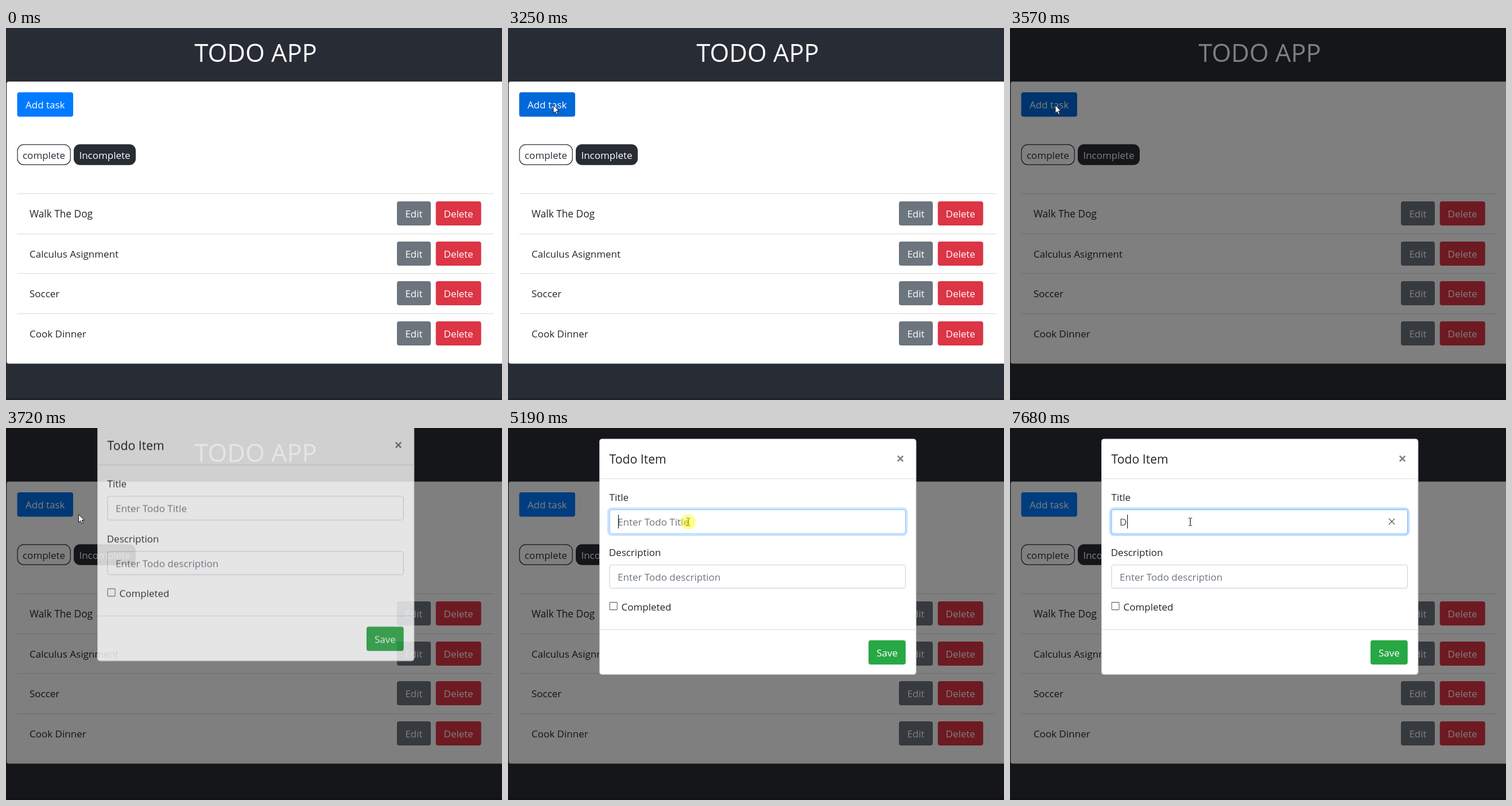
An HTML page with a canvas that plays this animation: 864x648 px, repeating every 8 s.

```html
<!DOCTYPE html>
<html lang="en">
<head>
<meta charset="utf-8">
<title>Todo app</title>
<style>
  html, body { margin: 0; width: 100%; height: 100%; overflow: hidden; background: #282c34; }
  canvas { display: block; width: 864px; height: 648px; }
</style>
</head>
<body>
<canvas id="stage" width="864" height="648"></canvas>
<script>
const W = 864, H = 648, LOOP = 8000;
const FONT = '"Open Sans", "Noto Sans", sans-serif';
const INK = '#212529', DARK = '#282c34', GREY = '#6c757d';
const view = document.getElementById('stage').getContext('2d');

const makeLayer = () => {
  const c = document.createElement('canvas');
  c.width = W;
  c.height = H;
  return c;
};
const modalLayer = makeLayer();
const modal = modalLayer.getContext('2d');

const clamp = v => Math.max(0, Math.min(1, v));
const ramp = (t, start, length) => clamp((t - start) / length);
const mix = (a, b, p) => a + (b - a) * p;
const mixRgb = (a, b, p) => `rgb(${a.map((v, i) => Math.round(mix(v, b[i], p)))})`;

// The screen refreshes in bursts: start, end, number of steps.
const bursts = [
  [0, 0, 1], [430, 590, 3], [910, 1140, 4], [1460, 2170, 10], [2860, 2860, 1],
  [3110, 3110, 1], [3250, 3250, 1], [3490, 4180, 10], [4730, 4870, 3],
  [5100, 5350, 4], [5500, 5660, 3], [6050, 6120, 2], [6600, 6670, 2],
  [7060, 7140, 2], [7620, 7680, 2]
];

function hold(t) {
  const [a, b, n] = bursts.filter(s => s[0] <= t).pop();
  if (n === 1) return a;
  const step = (b - a) / (n - 1);
  return a + Math.min(n - 1, Math.floor((t - a + 1) / step)) * step;
}

// Pointer moves: start, end, target x, target y.
const moves = [
  [430, 590, 512, 541], [835, 1140, 240, 354], [1385, 2170, 78.5, 134],
  [3570, 3720, 126, 150], [3720, 4180, 323, 145], [4655, 4870, 314, 163.5]
];

function pointerAt(t) {
  let x = 549, y = 586;
  for (const [a, b, tx, ty] of moves) {
    const p = ramp(t, a, b - a), e = 1 - (1 - p) ** 2;
    x = mix(x, tx, e);
    y = mix(y, ty, e);
  }
  return { x, y };
}

function box(g, x, y, w, h, r, fill, stroke, line = 1) {
  g.beginPath();
  g.roundRect(x, y, w, h, r);
  if (fill) { g.fillStyle = fill; g.fill(); }
  if (stroke) { g.strokeStyle = stroke; g.lineWidth = line; g.stroke(); }
}

function text(g, str, x, y, color = INK, size = 17, align = 'left') {
  g.font = `${size}px ${FONT}`;
  g.textAlign = align;
  g.fillStyle = color;
  g.fillText(str, x, y);
}

function button(g, str, x, y, w, h, color) {
  box(g, x, y, w, h, 4, color);
  text(g, str, x + w / 2, y + 28, '#fff', 17, 'center');
}

function rule(g, x, y, w, color) {
  g.fillStyle = color;
  g.fillRect(x, y, w, 1.2);
}

function cross(g, x, y, r, color, width) {
  g.beginPath();
  g.moveTo(x - r, y - r);
  g.lineTo(x + r, y + r);
  g.moveTo(x + r, y - r);
  g.lineTo(x - r, y + r);
  g.strokeStyle = color;
  g.lineWidth = width;
  g.stroke();
}

function drawPage(g, hover) {
  g.fillStyle = DARK;
  g.fillRect(0, 0, W, H);
  g.fillStyle = '#222127';
  g.fillRect(0, 645, W, 3);
  text(g, 'TODO APP', 435, 58.5, '#fff', 43.4, 'center');

  box(g, 1, 93.3, 900, 491.5, 4, '#fff');
  box(g, 1.5, 93.8, 900, 490.5, 4, null, 'rgba(0,0,0,.125)');
  button(g, 'Add task', 19.5, 112, 97.5, 42.5, mixRgb([0, 123, 255], [0, 105, 217], hover));

  box(g, 20, 203.2, 92.2, 35, 11, '#fff', DARK, 1.2);
  text(g, 'complete', 66, 228, DARK, 17, 'center');
  box(g, 118, 202.6, 108, 36.2, 11, DARK);
  text(g, 'Incomplete', 172, 228, '#fff', 17, 'center');

  ['Walk The Dog', 'Calculus Asignment', 'Soccer', 'Cook Dinner'].forEach((name, i) => {
    const y = Math.round(288 + i * 69.55);
    rule(g, 19.5, y, 830, '#dfdfdf');
    text(g, name, 41, y + 42, INK, i ? 17 : 17.3);
    button(g, 'Edit', 681, y + 14, 59, 42, GREY);
    button(g, 'Delete', 748.7, y + 14, 79, 42, '#dc3545');
  });
}

function input(g, y, h, focus) {
  if (focus) box(g, 174.7, y - 1.8, 519.6, h + 3.6, 6, null, `rgba(0,123,255,${.25 * focus})`, 3.6);
  box(g, 177, y + .5, 515.4, h - 1, 4, '#fff', mixRgb([206, 212, 218], [128, 189, 255], focus), 1.2);
}

function caretAlpha(t) {
  if (t >= 7680) return 1;
  return ramp(t, 5100, 80) - ramp(t, 5440, 220) + ramp(t, 5990, 130)
    - ramp(t, 6540, 130) + ramp(t, 7000, 140) - ramp(t, 7560, 130);
}

function drawModal(g, t) {
  const typed = t >= 7679;
  g.clearRect(0, 0, W, H);
  box(g, 159, 18.7, 552.3, 411, 5, '#fff');
  box(g, 159.5, 19.2, 551.3, 410, 5, null, 'rgba(0,0,0,.2)');
  text(g, 'Todo Item', 176.5, 62, INK, 21.2);
  cross(g, 683.5, 53.4, 4.7, '#7f7f7f', 2.6);
  rule(g, 160, 87.6, 550.3, '#dee2e6');

  text(g, 'Title', 176.5, 127);
  input(g, 142, 42.5, ramp(t, 5060, 150));
  if (typed) {
    text(g, 'D', 191, 170, '#495057');
    cross(g, 665, 163, 5, '#555', 1.2);
  } else {
    text(g, 'Enter Todo Title', 191, 170, GREY);
  }
  g.fillStyle = `rgba(33,37,41,${clamp(caretAlpha(t))})`;
  g.fillRect(typed ? 204 : 191.8, 151, 1.2, 24);

  text(g, 'Description', 175.7, 223);
  input(g, 238, 41.7, 0);
  text(g, 'Enter Todo description', 191, 266, GREY);

  box(g, 177.1, 303.6, 13, 13, 1, '#fff', '#666', 1.1);
  text(g, 'Completed', 197.5, 318);
  rule(g, 160, 350.5, 550.3, '#dee2e6');
  button(g, 'Save', 628, 369.7, 64.7, 42.3, '#28a745');
}

const shapes = {
  arrow: new Path2D('M.5.5V14.6L3.8 11.5 6 16.6 8.3 15.6 6.1 10.7H10.4Z'),
  hand: new Path2D('M-1.5 12V2Q-1.5.5 0 .5T1.5 2V7Q3.5 5.8 4.5 7.5 6.5 6.5 7.3 8.3 10.2 7.6 10.2 10.5V14Q10 17 8.3 20.5H-.3Q-1.2 17.8-4.6 13.4-5.2 11.2-3.2 11Z')
};

function drawPointer(g, kind, x, y) {
  g.save();
  g.translate(x, y);
  if (kind === 'beam') {
    g.fillStyle = '#111';
    g.fillRect(-.5, -6, 1.2, 12);
    for (const edge of [-7, 6]) {
      g.fillRect(-3, edge, 2.6, 1);
      g.fillRect(.6, edge, 2.6, 1);
    }
  } else {
    g.lineJoin = 'round';
    g.fillStyle = '#fff';
    g.strokeStyle = '#111';
    g.lineWidth = 1;
    g.fill(shapes[kind]);
    g.stroke(shapes[kind]);
  }
  g.restore();
}

function drawClick(g, x, y) {
  g.beginPath();
  g.arc(x, y, 13, 0, 7);
  g.fillStyle = 'rgba(255,255,0,.47)';
  g.fill();
}

// Rise along cubic-bezier(0, 0, .58, 1).
function easeOut(p) {
  let lo = 0, hi = 1;
  for (let i = 0; i < 20; i++) {
    const s = (lo + hi) / 2;
    if (1.74 * (1 - s) * s * s + s ** 3 < p) lo = s; else hi = s;
  }
  return 3 * lo * lo - 2 * lo ** 3;
}

function draw(time) {
  const t = hold(time);
  const { x, y } = pointerAt(t);
  drawPage(view, ramp(t, 1930, 150) - ramp(t, 3640, 150));

  view.fillStyle = `rgba(0,0,0,${.5 * ramp(t, 3420, 146)})`;
  view.fillRect(0, 0, W, H);

  if (t > 3600) {
    drawModal(modal, t);
    view.globalAlpha = ramp(t, 3600, 150);
    view.drawImage(modalLayer, 0, -55.2 * (1 - easeOut(ramp(t, 3600, 300))));
    view.globalAlpha = 1;
  }

  if (t >= 430) {
    const kind = t > 3490 && x > 176 ? 'beam' : t > 1930 && t < 3250 ? 'hand' : 'arrow';
    drawPointer(view, kind, x, y);
  }
  if ((t >= 2860 && t < 3110) || (t >= 5100 && t < 5349)) drawClick(view, x, y);
}

const begin = performance.now();
function tick() {
  draw((performance.now() - begin) % LOOP);
  requestAnimationFrame(tick);
}
tick();
</script>
</body>
</html>
```
